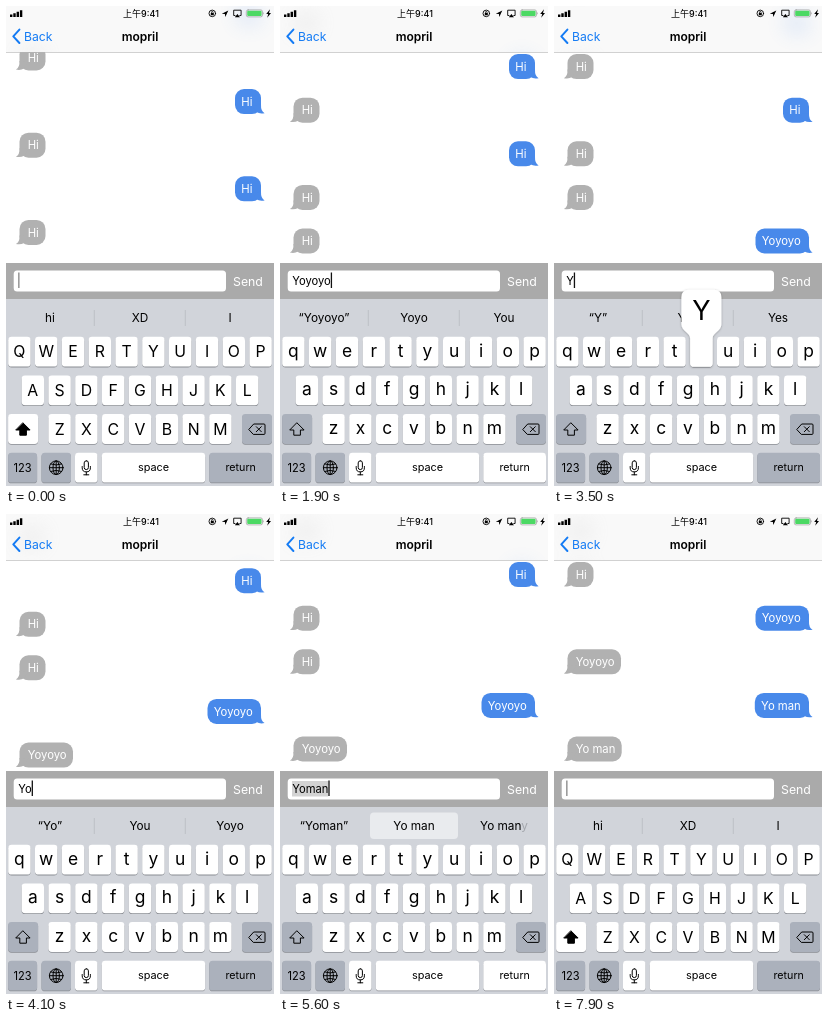
Animation, 268 px wide and 480 px high, one loop 8 s. Source, as an HTML page:

```html
<!DOCTYPE html>
<html lang="en">
<head>
<meta charset="utf-8">
<title>Chat</title>
<style>
  html, body { margin: 0; width: 100%; height: 100%; overflow: hidden; background: #fff; }
  svg { display: block; width: 100vw; height: 100vh; }
  text { font-family: Inter, "Noto Sans CJK TC", "Noto Sans CJK SC", sans-serif; white-space: pre; }
  .mid { text-anchor: middle; }
  .line { fill: none; stroke: #000; stroke-linecap: round; stroke-linejoin: round; }
</style>
</head>
<body>
<svg viewBox="0 0 268 480">
  <defs>
    <clipPath id="navClip"><rect width="268" height="46"/></clipPath>
    <filter id="blur" x="-20%" y="-20%" width="140%" height="140%"><feGaussianBlur stdDeviation="9"/></filter>
    <filter id="shade" x="-30%" y="-30%" width="160%" height="160%">
      <feDropShadow dx="0" dy="0.6" stdDeviation="1.3" flood-opacity="0.3"/>
    </filter>
  </defs>
  <rect width="268" height="480" fill="#fff"/>
  <g id="chat"></g>

  <rect width="268" height="46" fill="#f9f9f9"/>
  <g clip-path="url(#navClip)"><g id="chatBlur" filter="url(#blur)" opacity=".13"></g></g>
  <rect y="46" width="268" height=".6" fill="#b2b2b2"/>
  <g id="status">
    <path d="M4 8.5h2.4v2.5H4zM7.3 7.2h2.4V11H7.3zM10.6 5.8H13V11h-2.4zM13.9 4.3h2.4V11h-2.4z"/>
    <text class="mid" x="135" y="10.8" font-size="9" font-weight="500">上午9:41</text>
    <g class="line" stroke-width=".9">
      <circle cx="206.3" cy="7.4" r="3.3"/>
      <path d="M229 9.5h-1.3V4.2h7.4v5.3h-1.3"/>
      <rect x="240.3" y="3.9" width="16.2" height="7" rx="1.8" stroke="#8c8c8c" stroke-width=".6"/>
    </g>
    <path d="M204.8 7h3v2.2h-3zM205.2 7V6.3a1.1 1.1 0 0 1 2.2 0V7h-.6v-.6a.5.5 0 0 0-1 0V7zM215.8 7.8l6.5-3.4-3 6.6-.4-3.1zM231.4 8l2.6 3.3h-5.2zM264 3.3l-3.8 4.6h2l-1 3.9 3.8-4.9h-2z"/>
    <rect x="241.2" y="4.8" width="14.4" height="5.2" rx="1" fill="#4cd964"/>
    <path d="M257.3 6.1q1.3 1.3 0 2.6z" fill="#8c8c8c"/>
  </g>
  <path class="line" d="M13.4 23.6L7.3 30.3l6.1 6.7" style="stroke:#147bf4" stroke-width="2"/>
  <text x="18" y="34.8" font-size="12.2" fill="#147bf4">Back</text>
  <text class="mid" x="134" y="34.6" font-size="12" font-weight="600">mopril</text>

  <rect y="257" width="268" height="36" fill="#aaa"/>
  <rect x="7.7" y="264.5" width="212.3" height="21" rx="3.5" fill="#fff"/>
  <text x="227" y="279.6" font-size="12.3" fill="#fff">Send</text>
  <rect id="mark" x="12" y="267" height="15.5" fill="#d3d3d3"/>
  <text id="input" x="12.2" y="278.6" font-size="11.2"></text>
  <rect id="caret" y="266.5" width="1.3" height="15.5"/>

  <rect y="293" width="268" height="187" fill="#d1d4da"/>
  <g id="hints"></g>
  <g id="keys"></g>
  <g id="popup"></g>
</svg>
<script>
const LOOP = 8000, STEP = 100;
const BLUE = '#4889ea', GREY = '#b1b1b1';
const $ = id => document.getElementById(id);
const clamp = x => Math.max(0, Math.min(1, x));
const ease = x => (1 - Math.cos(Math.PI * clamp(x))) / 2;

const WIDTH = { 'Hi': 26, 'Yoyoyo': 53.5, 'Yo man': 54.2 };
const IDLE = ['hi', 'XD', 'I'];

// text, mine?, arrival time
const messages = [
  ['Hi', 1], ['Hi', 0], ['Hi', 1], ['Hi', 0], ['Hi', 1], ['Hi', 0],
  ['Hi', 0, -88], ['Yoyoyo', 1, 2400], ['Yoyoyo', 0, 3873],
  ['Yo man', 1, 6400], ['Yo man', 0, 7400]
].map(([text, mine, at = -1e4]) => ({ text, mine, at }));

// time, field text, suggestions
const typing = [
  [0, '', IDLE],
  [800, 'Y', ['“Y”', 'You', 'Yes']],
  [1000, 'Yo', ['“Y”', 'You', 'Yes']],
  [1100, 'Yoy', ['“Y”', 'You', 'Yes']],
  [1200, 'Yoyo', ['“Y”', 'You', 'Yes']],
  [1400, 'Yoyoy', ['“Yoyo”', 'Yoyo', 'You']],
  [1500, 'Yoyoyo', ['“Yoyoyo”', 'Yoyo', 'You']],
  [2400, '', IDLE],
  [3400, 'Y', ['“Y”', 'You', 'Yes']],
  [3700, 'Yo', ['“Yo”', 'You', 'Yoyo']],
  [4600, 'Yom', ['“Yom”', 'You', 'Tom']],
  [4900, 'Yoma', ['“Yoma”', 'Roma', 'Yo ma']],
  [5200, 'Yoman', ['“Yoman”', 'Yo man', 'Yo man<tspan fill="#a3a6ac">y</tspan>']],
  [6400, '', IDLE]
];
const blinkStart = { 0: -300, 2400: 2000, 6400: 6700 };
const returnHeld = [[1800, 2400], [5500, 6400]];

const rows = ['qwertyuiop', 'asdfghjkl', 'zxcvbnm'];
const PITCH = 26.8, rowY = r => 330.8 + 38.65 * r;
const keyX = (r, i) => [13.4, 26.8, 53.6][r] + PITCH * i;

const cache = {};
function put(id, html) {
  if (cache[id] !== html) $(id).innerHTML = cache[id] = html;
}

const label = (x, y, size, s) =>
  `<text class="mid" x="${x}" y="${y}" font-size="${size}">${s}</text>`;

function bubble({ text, mine }, y, alpha) {
  const w = WIDTH[text], side = mine ? -1 : 1;
  const x = mine ? 255 - w : 13.5;
  const edge = mine ? 255 : 13.5;
  const tail = `<path transform="translate(${edge} ${y}) scale(${side} 1)"
    d="M0 3Q.3 9.6-3.6 11.6Q1.5 12.6 4.5 10.5L9 4z"/>`;
  return `<g opacity="${alpha}" fill="${mine ? BLUE : GREY}">
    <rect x="${x}" y="${y - 12.5}" width="${w}" height="25" rx="9"/>${tail}
    <text x="${x + (mine ? 6.3 : 8.2)}" y="${y + 4.2}" font-size="11.3" fill="#fff">${text}</text></g>`;
}

function chat(t) {
  const scroll = messages.reduce((n, m) => n + ease((t - m.at) / 300), -1);
  return messages.map((m, i) => {
    const y = 235 - 43.6 * (scroll - i);
    if (y < -30 || y > 290 || t < m.at) return '';
    // an outgoing bubble stays pale until it is confirmed
    const alpha = m.mine ? 0.4 + 0.6 * clamp((t - m.at - 380) / 80) : 1;
    return bubble(m, y, alpha);
  }).join('');
}

function key(x, r, w, fill) {
  const box = (dy, c) =>
    `<rect x="${x}" y="${rowY(r) + dy}" width="${w}" height="29.8" rx="3.4" fill="${c}"/>`;
  return box(0.8, '#898c92') + box(0, fill);
}

function keyboard(caps, held) {
  const dark = '#abb1bc', light = '#fff';
  let s = '';
  rows.forEach((row, r) => [...row].forEach((c, i) => {
    const x = keyX(r, i);
    s += key(x - 11.2, r, 22.4, light) +
      label(x, rowY(r) + (caps ? 20.6 : 20), caps ? 15.8 : 17.4, caps ? c.toUpperCase() : c);
  }));
  s += key(2.1, 2, 30, caps ? light : dark) + key(236, 2, 30, dark) +
    key(2.1, 3, 29, dark) + key(35.5, 3, 29.5, dark) + key(69, 3, 22.5, light) +
    key(95.8, 3, 103.4, light) + key(203.3, 3, 62.7, held ? light : dark);
  s += label(16.6, 466, 11.1, '123') + label(147.5, 465.3, 10.9, 'space') + label(234.7, 465.3, 10.7, 'return');
  s += `<g class="line" stroke-width="1">
    <path d="M17.1 417l7 7h-3.7v5.2h-6.6V424h-3.7z" ${caps ? 'fill="#000"' : ''}/>
    <path d="M243 423.2l4.7-5.2h10.3q1 0 1 1v8.4q0 1-1 1h-10.3zM250.3 420.7l5 5m0-5l-5 5"/>
    <circle cx="50.2" cy="461.7" r="6.8"/><ellipse cx="50.2" cy="461.7" rx="3.2" ry="6.8"/>
    <path d="M50.2 455v13.5M43.4 461.7h13.6M44.9 458q5.3 2.1 10.6 0M44.9 465.4q5.3-2.1 10.6 0"/>
    <rect x="78.2" y="454.8" width="4.2" height="8.8" rx="2.1"/>
    <path d="M76.2 460.5v1.3a4.1 4.1 0 0 0 8.2 0v-1.3M80.3 466v2.8M77.8 468.8h5"/></g>`;
  return s;
}

function hints(words, marked) {
  const back = marked
    ? '<rect x="90" y="298.5" width="88" height="26.5" rx="4" fill="#e9ebee"/>'
    : '<path d="M88.3 304v16M179.3 304v16" stroke="#b5b8be" stroke-width=".7"/>';
  return back + words.map((w, i) => label(44 + 90 * i, 316.2, 11.8, w)).join('');
}

function popup(c) {
  const r = rows.findIndex(row => row.includes(c.toLowerCase()));
  const x = keyX(r, rows[r].indexOf(c.toLowerCase())), y = rowY(r);
  return `<path transform="translate(${x} ${y})" fill="#fff" filter="url(#shade)"
    d="M-12.5-47h25q7.5 0 7.5 7.5v27c0 7-8.8 8-8.8 14.5v24.6q0 3.4-3.4 3.4h-15.6q-3.4 0-3.4-3.4V2c0-6.5-8.8-7.5-8.8-14.5v-27q0-7.5 7.5-7.5z"/>` +
    label(x, y - 17, 27, c);
}

function draw(t) {
  const [at, text, words] = typing.findLast(s => s[0] <= t);
  const corrected = text === 'Yoman' && t >= at + 200;
  const list = chat(t);
  put('chat', list);
  put('chatBlur', list);
  put('input', text);
  put('hints', hints(words, corrected));
  put('keys', keyboard(!text, returnHeld.some(([a, b]) => t >= a && t < b)));
  put('popup', text && t < at + 200 ? popup(text.at(-1)) : '');

  const width = text ? $('input').getComputedTextLength() : 0;
  $('mark').setAttribute('width', corrected ? width : 0);
  const caret = $('caret');
  caret.setAttribute('x', 12.2 + width);
  caret.setAttribute('fill', text ? '#111' : '#858585');
  caret.setAttribute('opacity', text || (t - blinkStart[at]) % 1000 < 500 ? 1 : 0);
}

const start = performance.now();
function tick() {
  const t = (performance.now() - start) % LOOP;
  draw(Math.floor(t / STEP) * STEP);
  requestAnimationFrame(tick);
}
tick();
</script>
</body>
</html>
```
